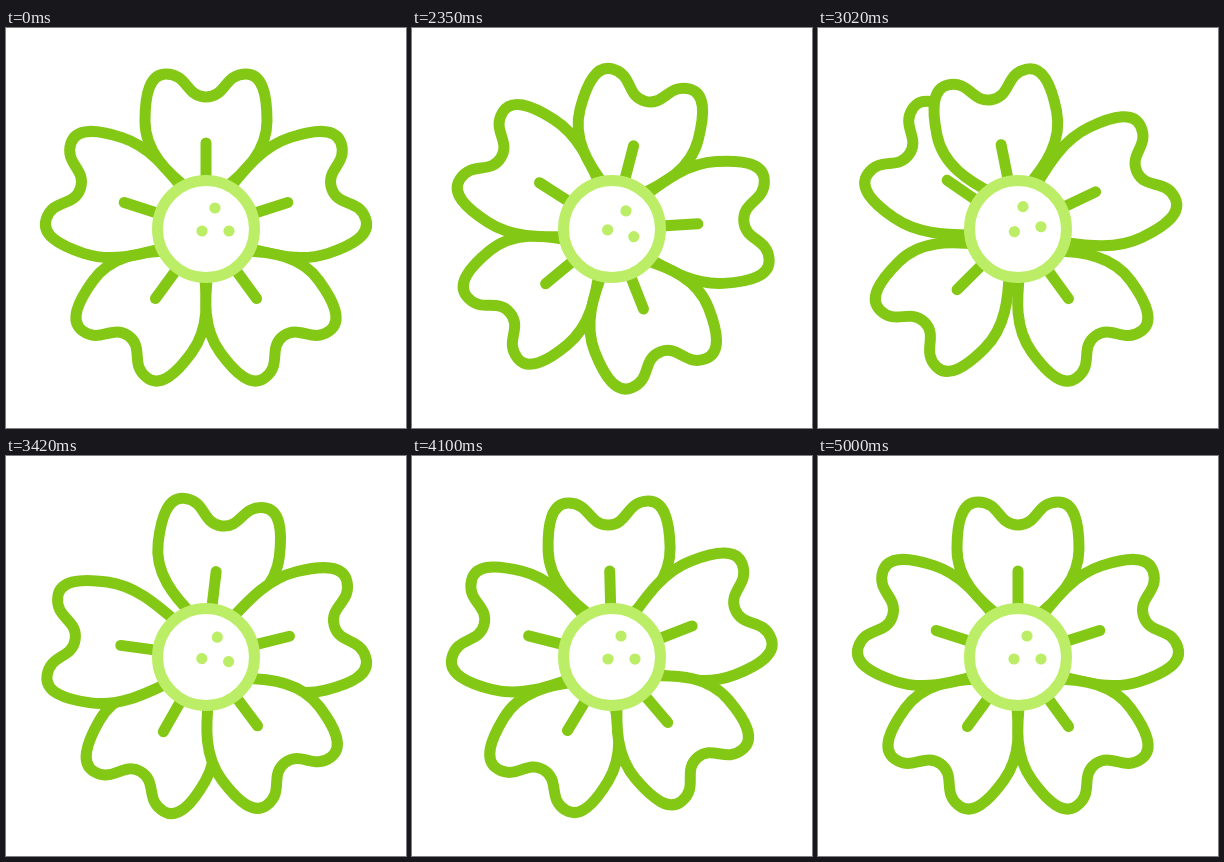
An HTML page that plays this animation: 400x400 px, repeating every 5.02 s.

```html
<!DOCTYPE html>
<html>
<head>
<meta charset="utf-8">
<style>
  html, body { margin: 0; width: 100%; height: 100%; overflow: hidden; background: #fff; }
  svg { display: block; width: 100vw; height: 100vh; }
</style>
</head>
<body>
<svg viewBox="-200 -201 400 400">
  <g id="petals" fill="#fff" stroke="#84c816" stroke-width="11" stroke-linecap="round" stroke-linejoin="round"></g>
  <circle r="48.5" fill="#fff" stroke="#bbee66" stroke-width="11"/>
  <g id="core" fill="#bbee66">
    <circle cx="9" cy="-21" r="5.6"/>
    <circle cx="-4" cy="2" r="5.6"/>
    <circle cx="23" cy="2" r="5.6"/>
  </g>
</svg>
<script>
const LOOP = 5020, LAG = 78;
// Swing keyframes: [time in ms, angle in degrees]
const KEYS = [[2000, 0], [2540, 20], [2962, -11.5], [3372, 7], [3792, -4.8], [4242, 1.5], [4610, 0]];
const PEAK = KEYS[1][0];

function swing(time) {
  if (time <= KEYS[0][0]) return 0;
  for (let i = 1; i < KEYS.length; i++) {
    const [t0, a0] = KEYS[i - 1], [t1, a1] = KEYS[i];
    if (time < t1) {
      const p = (time - t0) / (t1 - t0);
      return a0 + (a1 - a0) * (1 - Math.cos(Math.PI * p)) / 2;
    }
  }
  return 0;
}

// All parts wind up together, then are released one after another.
const angleAt = (time, order) =>
  swing(time < PEAK ? time : Math.max(PEAK, time - order * LAG));

const rotate = (el, angle) => el.setAttribute('transform', `rotate(${angle})`);

// Upright petal; each side's base is narrow (-1), even (0) or wide (1).
function petalPath(left, right) {
  const base = s => [22 + 6 * s, 4.5 * s - 34];
  const bend = s => [42 + 2 * s, 1.5 * s - 55.5];
  const [lx, ly] = base(left), [bx, by] = bend(left);
  return `M${-lx} ${ly}C${-bx} ${by}-61-78-61-108C-61-136-56-155-40-155C-18-155-20-132 0-132` +
    `C20-132 18-155 40-155C56-155 61-136 61-108C61-78 ${bend(right)} ${base(right)}M0-45V-86`;
}

const layer = document.getElementById('petals');
const core = document.getElementById('core');

// [clockwise position from the top, left base, right base], back to front
const petals = [[3, 0, -1], [4, 1, 1], [0, -1, -1], [1, 1, 1], [2, -1, 0]].map(([place, left, right]) => {
  const el = document.createElementNS('http://www.w3.org/2000/svg', 'path');
  el.setAttribute('d', petalPath(left, right));
  layer.append(el);
  return { el, place };
});

function draw(now) {
  const time = now % LOOP;
  for (const { el, place } of petals) rotate(el, place * 72 + angleAt(time, place + 1));
  rotate(core, angleAt(time, 0));
}

const start = performance.now();
function frame() {
  draw(performance.now() - start);
  requestAnimationFrame(frame);
}
frame();
</script>
</body>
</html>
```
